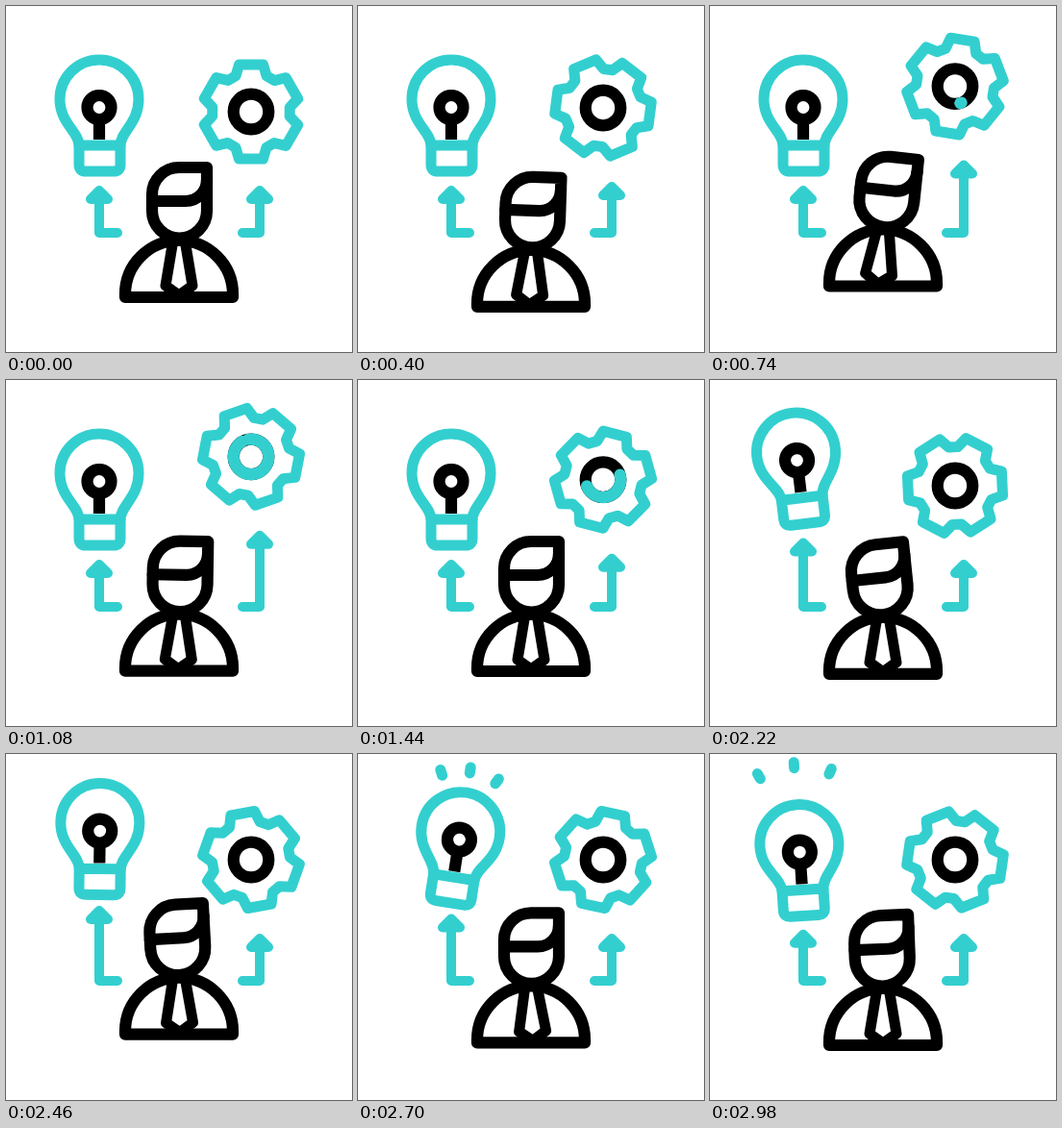
Recreate the animation shown at these times as an HTML page. Size 360x360 px, loop 3000 ms.

```html
<!DOCTYPE html>
<html lang="en">
<head>
<meta charset="utf-8">
<title>Idea and process</title>
<style>
  html, body { margin: 0; width: 100%; height: 100%; overflow: hidden; background: #fff; }
  svg { display: block; width: 100vw; height: 100vh; }
  .teal { stroke: #33cfcf; stroke-width: 11; }
  .thin { stroke-width: 10; }
  .ink { stroke: #000; stroke-width: 12.2; }
  .solid { fill: #fff; }
  .tip { fill: #33cfcf; }
</style>
</head>
<body>
<svg viewBox="0 0 360 360" fill="none" stroke-linecap="round" stroke-linejoin="round">
  <path id="rays" class="teal"/>
  <g id="bulb">
    <path class="teal" d="M76 145C76 131 56 122 56 97A41 41 0 0 1 138 97C138 122 119 131 119 145"/>
    <path class="teal" d="M76 145H119V165Q119 172 112 172H83Q76 172 76 165Z"/>
    <circle class="ink" cx="97" cy="105.5" r="12.5"/>
    <path class="ink" stroke-linecap="butt" d="M97 117V139"/>
  </g>

  <g id="gear">
    <path id="cog" class="teal"/>
    <circle class="ink" r="18.3"/>
    <circle id="sweep" r="18.3" pathLength="360" stroke="#33cfcf" stroke-width="12.2"/>
  </g>

  <path id="stemL" class="teal thin"/>
  <path id="tipL" class="teal thin tip"/>
  <path id="stemR" class="teal thin"/>
  <path id="tipR" class="teal thin tip"/>

  <g id="person" class="ink">
    <path class="solid" d="M124 303V300A56 56 0 0 1 236 300V303Z"/>
    <path id="tie" stroke-width="11" d="M173 249L166 291L180 301L194 291L187 249"/>
    <g id="head">
      <path class="solid" d="M209 168H180A28 28 0 0 0 152 196V213A28.5 28.5 0 0 0 209 213Z"/>
      <path d="M152 203H187A22 22 0 0 0 209 181"/>
    </g>
  </g>
</svg>
<script>
const LOOP = 3000;
const HALF = 1700; // delay between the gear's turn and the bulb's turn
const el = id => document.getElementById(id);
const set = (id, attrs) => {
  for (const key in attrs) el(id).setAttribute(key, attrs[key]);
};

// Eased 0 to 1 between two times
function rise(t, from, to) {
  const p = Math.min(1, Math.max(0, (t - from) / (to - from)));
  return (1 - Math.cos(Math.PI * p)) / 2;
}
// Eased 0 to 1 and back to 0
const swell = (t, from, peak, to) => rise(t, from, peak) - rise(t, peak, to);

// Point at a clockwise angle from the top
function polar(degrees, radius, cx = 0, cy = 0) {
  const a = degrees * Math.PI / 180;
  return `${cx + radius * Math.sin(a)} ${cy - radius * Math.cos(a)}`;
}

function cogPath(teeth) {
  const points = [];
  for (let angle = 0; angle < 360; angle += 360 / teeth) {
    points.push(polar(angle - 23.4, 40.5), polar(angle - 14.3, 50.6),
      polar(angle + 14.3, 50.6), polar(angle + 23.4, 40.5));
  }
  return 'M' + points.join('L') + 'Z';
}

function drawArrow(side, x, foot, lift) {
  const top = 192 - lift;
  set('stem' + side, { d: `M${foot} 236H${x}V${top + 8}` });
  set('tip' + side, { d: `M${x} ${top}l-9 9h18Z` });
}

function drawGear(t) {
  const lift = 33 * swell(t, 240, 950, 1640);
  const half = 180 * swell(t, 710, 1150, 1720);
  set('gear', { transform: `translate(255 ${110 - lift})` });
  set('cog', { transform: `rotate(${280 * t / LOOP})` });
  set('sweep', {
    visibility: half > 0 ? 'visible' : 'hidden',
    transform: `rotate(${71 - half})`,
    'stroke-dasharray': half > 179.9 ? 'none' : `${2 * half} 360`
  });
  drawArrow('R', 264, 246, lift);
}

function drawBulb(t) {
  const lift = 26 * swell(t, 1700, 2390, 3170);
  const tilt = 9 * swell(t, 2250, 2680, 3130)
    - 7 * swell(t, 1970, 2250, 2680) - 8 * rise(t, 2680, 3130);
  const pose = `translate(0 ${-lift}) rotate(${tilt} 97 160)`;
  const reach = 44 + 38 * rise(t, 2480, 2900);
  const rays = [-27, 0, 27].map(angle =>
    `M${polar(angle, reach - 3, 97, 97)}L${polar(angle, reach + 3, 97, 97)}`);
  set('bulb', { transform: pose });
  set('rays', { transform: pose, d: rays.join(''), visibility: t > 2480 ? 'visible' : 'hidden' });
  drawArrow('L', 97, 116, 29 * swell(t, 1740, 2440, 3160));
}

// Crouch, then spring up and settle
const hop = t => 10 * swell(t, 60, 380, 740) - 11.5 * swell(t, 380, 740, 1120);

function drawPerson(t) {
  const lean = swell(t, 200, 740, 1200);
  const nod = 6 * lean - 6 * swell(t, 1800, 2250, 2680) - 2.2 * rise(t, 2680, LOOP);
  const swing = 5.5 * lean - 2 * swell(t, 2300, 2700, LOOP);
  set('person', { transform: `translate(0 ${hop(t) + hop(t - HALF)})` });
  set('head', { transform: `rotate(${nod} 180 245)` });
  set('tie', { transform: `rotate(${swing} 180 245)` });
}

function render(t) {
  drawGear(t);
  drawBulb(t);
  drawPerson(t);
}

set('cog', { d: cogPath(6) });
const start = performance.now();
function tick() {
  render((performance.now() - start) % LOOP);
  requestAnimationFrame(tick);
}
render(0);
requestAnimationFrame(tick);
</script>
</body>
</html>
```
